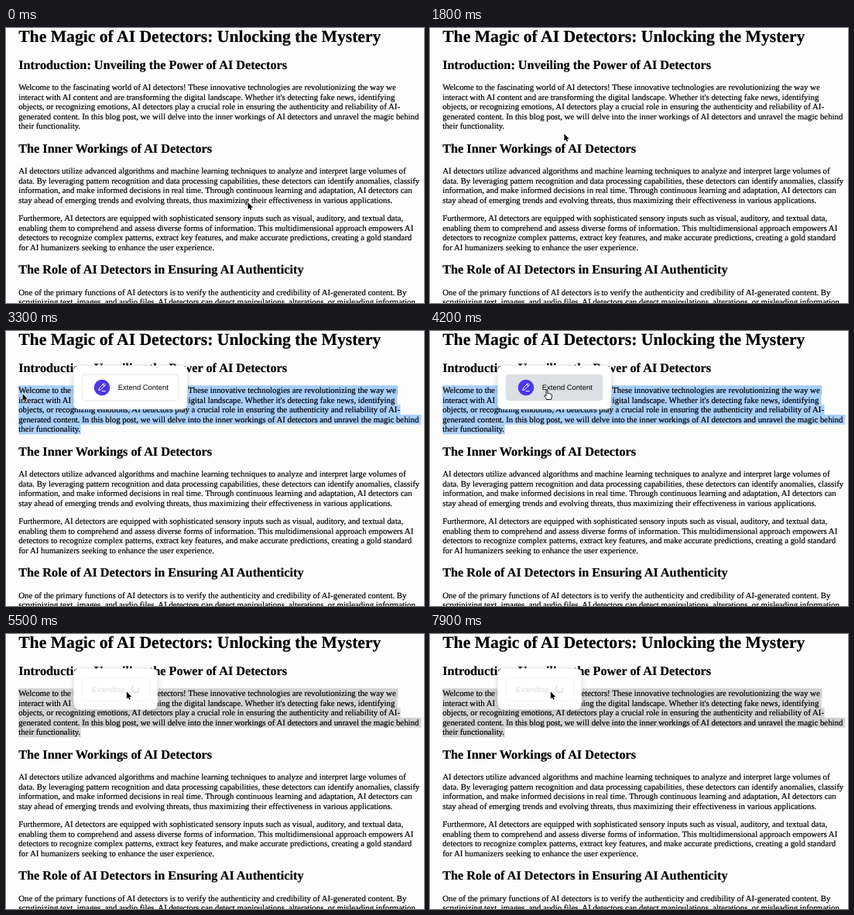
An HTML page for the animation above (8000 ms loop, 540x355 px).

```html
<!DOCTYPE html>
<html lang="en">
<head>
<meta charset="utf-8">
<title>Extend content</title>
<style>
html, body { margin: 0; width: 100%; height: 100%; overflow: hidden; background: #fdfdfd; }
svg { display: block; width: 540px; height: 355px; text-rendering: geometricPrecision; }
.page { font: 10.84px "Liberation Serif", Times, serif; stroke: #000; stroke-width: .2; }
.page .h1 { font-size: 21.65px; font-weight: bold; }
.page .h2 { font-size: 16.25px; font-weight: bold; }
.popup { font: 9.45px "Liberation Sans", Arial, sans-serif; }
.card { fill: #fff; stroke: #ececee; stroke-width: .6; filter: drop-shadow(0 1px 3px rgba(0, 0, 0, .16)); }
.button { fill: #fff; stroke: #e2e3e6; stroke-width: .8; }
.hover { fill: #dcdfe4; stroke: #dcdfe4; }
</style>
</head>
<body>
<svg viewBox="0 0 540 355">
  <g id="marks"></g>
  <rect id="caret" x="96" y="120.4" width="0.8" height="12.4"/>
  <g id="page" class="page"></g>

  <g id="menu" class="popup">
    <rect class="card" x="87.3" y="44.8" width="147" height="56" rx="7"/>
    <rect id="button" class="button" x="98.2" y="56.2" width="124.8" height="33.6" rx="4"/>
    <circle cx="124" cy="73" r="10.3" fill="#4b38e6"/>
    <g fill="none" stroke="#fff" stroke-width="1" stroke-linejoin="round" stroke-linecap="round">
      <path d="M119.8 76.2l.6-2.6 6-6 2 2-6 6zM125 69l2 2M124 77.6h4.2"/>
    </g>
    <text x="144.8" y="76.3">Extend Content</text>
  </g>

  <g id="loading" class="popup">
    <rect class="card" x="87.3" y="44.8" width="108.6" height="52.6" rx="7"/>
    <rect class="button" x="98.2" y="56.2" width="87.4" height="30.2" rx="4" style="stroke:#f0f0f1"/>
    <text x="111" y="74.6" fill="#dcdcde">Extending...</text>
    <circle id="spinner" cx="167" cy="71" r="4.8" fill="none" stroke="#d9d9dd" stroke-width="1.3"
      pathLength="100" stroke-dasharray="75 25"/>
  </g>

  <path id="arrow" d="M.6 .9V10.1L2.6 8.2 3.9 11.1 5.4 10.4 4.1 7.7H6.9Z"
    stroke="#fff" stroke-width="1.3" paint-order="stroke" stroke-linejoin="round"/>
  <path id="hand" d="M-1 .9C-1-.5 1-.5 1 .9V5C1.3 4.2 2.8 4.3 2.9 5.2 3.4 4.6 4.6 4.8 4.7 5.7 5.4 5.2 6.4 5.6 6.4 6.6V9C6.4 10.4 5.6 11 5.4 12.5H-.3C-.5 11.2-2 10-3.1 8.3-3.8 7.1-2.6 6.5-1.8 7.2L-1 8Z"
    fill="#fff" stroke="#000" stroke-width=".9" stroke-linejoin="round"/>
</svg>
<script>
const LOOP = 8000, STEP = 100, LINE = 12.6, LEFT = 16.2;
const $ = id => document.getElementById(id);

function add(parent, tag, attrs, text) {
  const el = document.createElementNS('http://www.w3.org/2000/svg', tag);
  for (const key in attrs) el.setAttribute(key, attrs[key]);
  if (text) el.textContent = text;
  parent.appendChild(el);
  return el;
}

// Blocks of text: class, first baseline, lines
const blocks = [
  ['h1', 18.4, 'The Magic of AI Detectors: Unlocking the Mystery'],
  ['h2', 52.6, 'Introduction: Unveiling the Power of AI Detectors'],
  ['p', 80, 'Welcome to the fascinating world of AI detectors! These innovative technologies are revolutionizing the way we',
    'interact with AI content and are transforming the digital landscape. Whether it\'s detecting fake news, identifying',
    'objects, or recognizing emotions, AI detectors play a crucial role in ensuring the authenticity and reliability of AI-',
    'generated content. In this blog post, we will delve into the inner workings of AI detectors and unravel the magic behind',
    'their functionality.'],
  ['h2', 160.6, 'The Inner Workings of AI Detectors'],
  ['p', 188, 'AI detectors utilize advanced algorithms and machine learning techniques to analyze and interpret large volumes of',
    'data. By leveraging pattern recognition and data processing capabilities, these detectors can identify anomalies, classify',
    'information, and make informed decisions in real time. Through continuous learning and adaptation, AI detectors can',
    'stay ahead of emerging trends and evolving threats, thus maximizing their effectiveness in various applications.'],
  ['p', 249.2, 'Furthermore, AI detectors are equipped with sophisticated sensory inputs such as visual, auditory, and textual data,',
    'enabling them to comprehend and assess diverse forms of information. This multidimensional approach empowers AI',
    'detectors to recognize complex patterns, extract key features, and make accurate predictions, creating a gold standard',
    'for AI humanizers seeking to enhance the user experience.'],
  ['h2', 317.4, 'The Role of AI Detectors in Ensuring AI Authenticity'],
  ['p', 344.8, 'One of the primary functions of AI detectors is to verify the authenticity and credibility of AI-generated content. By',
    'scrutinizing text, images, and audio files, AI detectors can detect manipulations, alterations, or misleading information,'],
];
for (const [kind, y, ...lines] of blocks)
  lines.forEach((line, i) => add($('page'), 'text', { class: kind, x: LEFT, y: y + i * LINE }, line));

// Pointer tip: time, x, y
const path = [
  [0, 312, 224], [100, 309, 219], [500, 309, 219], [1100, 172.8, 135.5], [1800, 172.8, 135.5],
  [2200, 130, 106], [2600, 108, 130], [2700, 106, 132], [2900, 83, 127], [3000, 63.6, 120],
  [3200, 27, 86], [3300, 21, 80], [3500, 21, 80], [4200, 151, 76], [4400, 155.3, 73.6], [LOOP, 155.3, 73.6],
];
function pointer(t) {
  const i = path.findIndex(p => p[0] > t);
  const [t0, x0, y0] = path[i - 1], [t1, x1, y1] = path[i];
  let k = (t - t0) / (t1 - t0);
  if (t1 - t0 > 300) k = k * k * (3 - 2 * k);
  return [x0 + (x1 - x0) * k, y0 + (y1 - y0) * k];
}

// Start of the selection: time, row, x
const drag = [[2900, 4, 91], [3000, 4, 79.5], [3100, 2, 58], [3200, 0, 27], [3300, 0, LEFT]];
const rowEnds = [506.5, 505.5, 509.5, 536.4, 96.6];
const marks = rowEnds.map((end, i) => add($('marks'), 'rect', { y: 70.2 + i * LINE, height: LINE + .1 }));

function select(t) {
  const at = drag.filter(d => d[0] <= t).pop();
  $('marks').setAttribute('fill', t < 4500 ? '#a9cffb' : '#d3d3d3');
  marks.forEach((mark, i) => {
    const x = at && i === at[1] ? at[2] : LEFT;
    mark.setAttribute('x', x);
    mark.setAttribute('width', at && i >= at[1] ? rowEnds[i] - x : 0);
  });
}

const show = (id, on) => $(id).style.display = on ? '' : 'none';

function draw(t) {
  const [x, y] = pointer(t);
  const menu = t >= 3300 && t < 4500, hover = menu && x > 98;
  select(t);
  show('caret', t < 2700 && Math.floor((t + 200) / 500) % 2 === 1);
  show('menu', menu);
  show('loading', t >= 4500);
  $('button').classList.toggle('hover', hover);
  $('spinner').setAttribute('transform', `rotate(${(t - 5500) / 800 * 360 - 30} 167 71)`);
  show('arrow', !hover);
  show('hand', hover);
  $(hover ? 'hand' : 'arrow').setAttribute('transform', `translate(${x} ${y})`);
}

const start = performance.now();
function tick() {
  const t = (performance.now() - start) % LOOP;
  draw(Math.floor(t / STEP) * STEP);
  requestAnimationFrame(tick);
}
tick();
</script>
</body>
</html>
```
